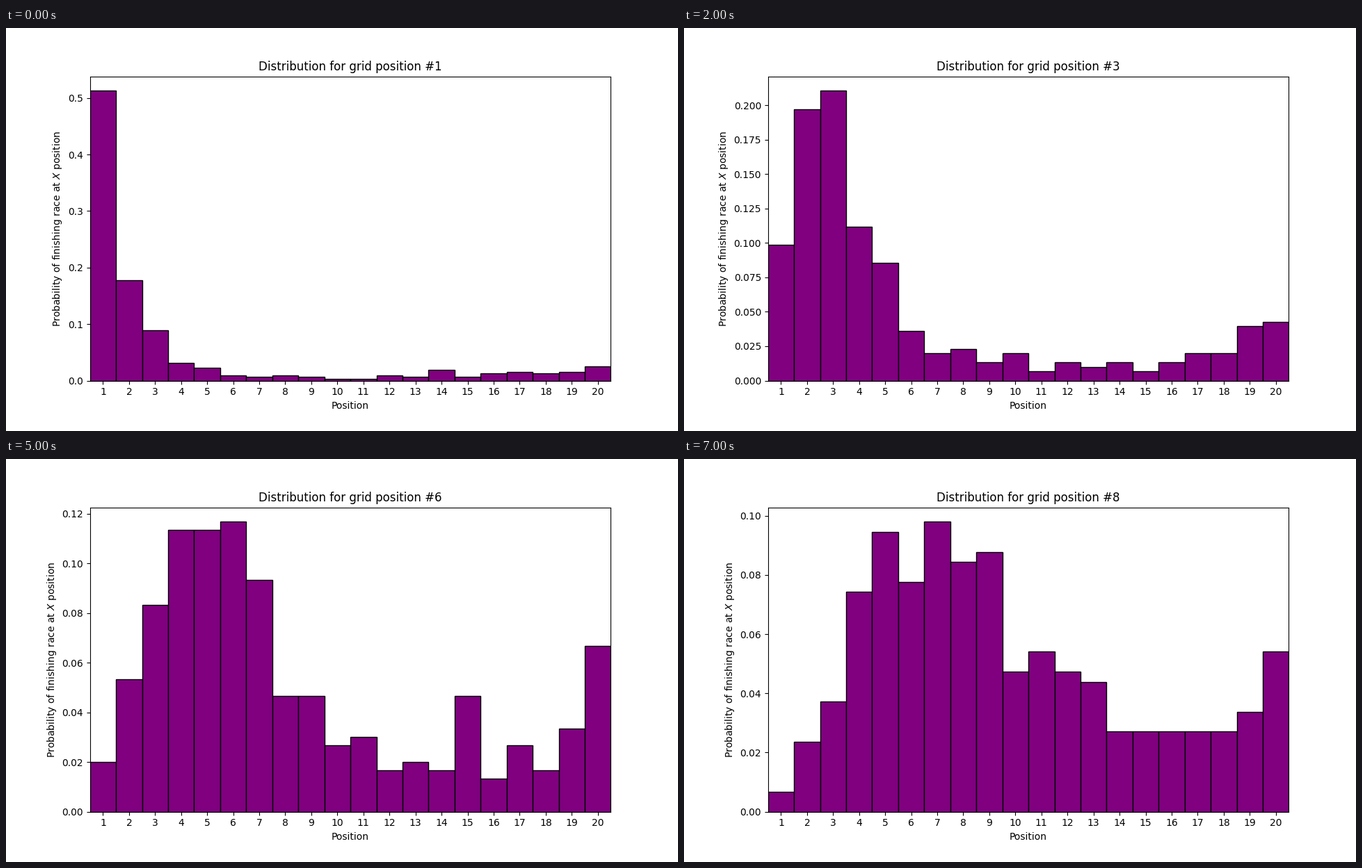
Animation, 966 px wide and 580 px high, one loop 8 s. Source, as a matplotlib script:

```python
import numpy as np
import matplotlib.pyplot as plt
from matplotlib.animation import FuncAnimation

W, H, DPI = 966, 580, 100
PLACES = np.arange(1, 21)

# grid position: (number of starts, finishes in places 1 to 20)
RESULTS = {
    1: (316, [162, 56, 28, 10, 7, 3, 2, 3, 2, 1, 1, 3, 2, 6, 2, 4, 5, 4, 5, 8]),
    3: (304, [30, 60, 64, 34, 26, 11, 6, 7, 4, 6, 2, 4, 3, 4, 2, 4, 6, 6, 12, 13]),
    5: (298, [7, 23, 36, 48, 35, 27, 18, 10, 6, 12, 9, 5, 2, 10, 2, 5, 5, 15, 6, 17]),
    6: (300, [6, 16, 25, 34, 34, 35, 28, 14, 14, 8, 9, 5, 6, 5, 14, 4, 8, 5, 10, 20]),
    7: (298, [6, 11, 21, 19, 35, 32, 27, 26, 17, 13, 6, 10, 5, 7, 9, 9, 14, 6, 9, 16]),
    8: (296, [2, 7, 11, 22, 28, 23, 29, 25, 26, 14, 16, 14, 13, 8, 8, 8, 8, 8, 10, 16]),
}


def probabilities(grid):
    if grid in RESULTS:
        starts, counts = RESULTS[grid]
        return np.array(counts) / starts
    # positions without counts: geometric blend of both neighbours
    blend = np.sqrt(probabilities(grid - 1) * probabilities(grid + 1))
    return np.round(300 * blend / blend.sum()) / 300


plt.rcParams["font.family"] = "DejaVu Sans"
fig = plt.figure(figsize=(W / DPI, H / DPI), dpi=DPI, facecolor="white")
fig.subplots_adjust(left=0.125, right=0.9, bottom=0.125, top=0.88)
ax = fig.add_subplot()


def draw(frame):
    grid = frame + 1
    ax.clear()
    ax.bar(PLACES, probabilities(grid), width=1, color="purple",
           edgecolor="black", linewidth=1)
    ax.set_xlim(0.5, 20.5)
    ax.set_xticks(PLACES)
    ax.set_title(f"Distribution for grid position #{grid}")
    ax.set_xlabel("Position")
    ax.set_ylabel("Probability of finishing race at $X$ position")


anim = FuncAnimation(fig, draw, frames=8, init_func=lambda: None,
                     interval=1000, repeat=True, repeat_delay=0, blit=False)
plt.show()
```
